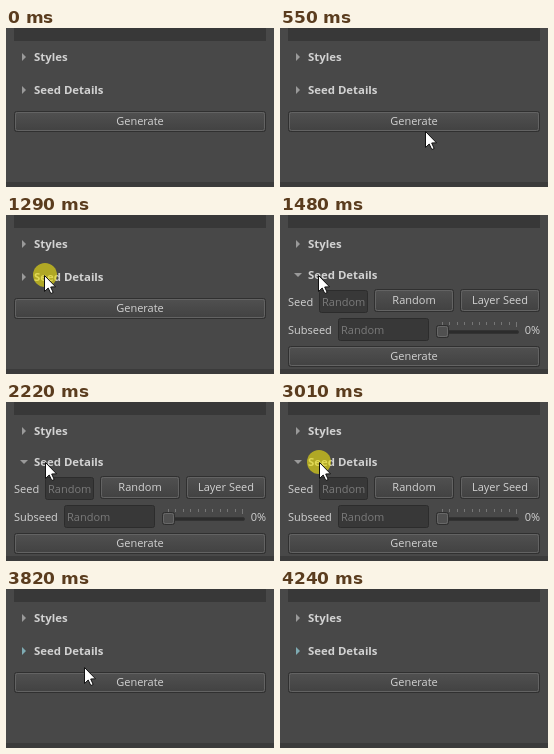
An HTML page with a canvas for the animation above (4900 ms loop, 268x159 px).

```html
<!DOCTYPE html>
<html lang="en">
<head>
<meta charset="utf-8">
<title>Seed panel</title>
<style>
html, body { margin: 0; width: 100%; height: 100%; overflow: hidden; background: #484848; }
canvas { display: block; width: 268px; height: 159px; }
</style>
</head>
<body>
<canvas id="stage" width="268" height="159"></canvas>
<script>
const ctx = document.getElementById('stage').getContext('2d');
const LOOP = 4900, STEP = 70;
const FONT = '"Open Sans", "Noto Sans", sans-serif';
const BG = '#484848', DARK = '#2c2c2c', TEXT = '#d2d2d2', ARROW = '#9a9a9a', FOCUS = '#7fabb3';

const within = (t, a, b) => t >= a && t < b;
const clamp = u => Math.min(1, Math.max(0, u));
const smooth = u => u * u * (3 - 2 * u);

// Pointer moves: when each starts and ends, and where it arrives.
const moves = [
  { from: 200, to: 550, x: 145, y: 103 },
  { from: 550, to: 690, x: 145, y: 88 },
  { from: 690, to: 900, x: 38, y: 60 },
  { from: 2150, to: 2220, x: 39, y: 60 },
  { from: 3680, to: 4170, x: 237, y: 152 }
];

function pointerAt(t) {
  let x = 214, y = 152;
  for (const m of moves) {
    const held = Math.floor((t - m.from) / STEP) * STEP;
    const u = smooth(clamp(held / (m.to - m.from)));
    x += (m.x - x) * u;
    y += (m.y - y) * u;
  }
  return [Math.round(x), Math.round(y)];
}

function rect(x, y, w, h, color) {
  ctx.fillStyle = color;
  ctx.fillRect(x, y, w, h);
}

function poly(points, fill, stroke) {
  ctx.beginPath();
  points.forEach(([x, y]) => ctx.lineTo(x, y));
  ctx.closePath();
  ctx.fillStyle = fill;
  ctx.fill();
  if (stroke) {
    ctx.strokeStyle = stroke;
    ctx.lineWidth = 1;
    ctx.stroke();
  }
}

function box(x, y, w, h, fill, stroke) {
  ctx.beginPath();
  ctx.roundRect(x + 0.5, y + 0.5, w - 1, h - 1, 2);
  ctx.fillStyle = fill;
  ctx.fill();
  ctx.strokeStyle = stroke;
  ctx.lineWidth = 1;
  ctx.stroke();
}

// Runs a drawing inside a clipped area.
function clipped(x, y, w, h, paint) {
  ctx.save();
  ctx.beginPath();
  ctx.rect(x, y, w, h);
  ctx.clip();
  paint();
  ctx.restore();
}

function text(str, x, base, color = TEXT, align = 'left', font = '11px') {
  ctx.font = `${font} ${FONT}`;
  ctx.textAlign = align;
  ctx.fillStyle = color;
  ctx.fillText(str, x, base);
}

function button(label, x, y, w, h, color = TEXT) {
  const shade = ctx.createLinearGradient(0, y, 0, y + h);
  shade.addColorStop(0, '#515151');
  shade.addColorStop(1, '#414141');
  box(x, y, w, h, shade, '#303030');
  box(x + 1, y + 1, w - 2, h - 2, shade, '#636363');
  text(label, x + w / 2, Math.floor(y + h / 2) + 4, color, 'center');
}

function field(x, y, w, h) {
  box(x, y, w, h, '#383838', DARK);
  clipped(x, y, w - 1, h, () => text('Random', x + 3, y + h / 2 + 4, '#7a7a7a'));
}

function header(label, y, open, color) {
  poly(open ? [[14, y - 2], [22, y - 2], [18, y + 2]]
            : [[16, y - 4], [20, y], [16, y + 4]], color);
  text(label, 28, y + 4, TEXT, 'left', '700 11.4px');
}

function slider(x, y) {
  for (let i = 0; i < 11; i++) {
    rect(x + Math.round(i * 7.4), y, 1, i % 10 ? 3 : 5, '#767676');
  }
  box(x, y + 8, 77, 4, DARK, '#333333');
  box(x - 6, y + 3, 13, 13, '#505050', '#2e2e2e');
  box(x - 5, y + 4, 11, 11, '#505050', '#686868');
}

function details() {
  text('Seed', 8, 91);
  field(39, 75, 49, 23);
  button('Random', 94, 74, 80, 23);
  button('Layer Seed', 180, 74, 80, 23);
  text('Subseed', 8, 119);
  field(58, 103, 91, 23);
  slider(162, 107);
  text('0%', 260, 119, TEXT, 'right');
}

// Rows squeezed to thin slices while the panel closes.
function squeezed() {
  clipped(8, 75, 252, 4, () => text('Seed', 8, 83));
  rect(39, 75, 49, 1, DARK);
  rect(58, 82, 91, 1, DARK);
  clipped(8, 81, 252, 4, () => {
    text('Subseed', 8, 89);
    text('0%', 260, 89, TEXT, 'right');
  });
}

function drawPointer(t) {
  ctx.save();
  ctx.translate(...pointerAt(t).map(v => v + 0.5));
  poly([[0, 0], [0, 16], [3.7, 12.5], [6.3, 18], [8.7, 17], [6.2, 11.5], [11, 11.3]],
    '#ffffff', '#111111');
  ctx.restore();
}

function drawClick() {
  ctx.beginPath();
  ctx.arc(39, 60, 12, 0, Math.PI * 2);
  ctx.fillStyle = 'rgba(230, 218, 20, 0.66)';
  ctx.fill();
}

function draw(t) {
  const open = within(t, 1480, 3350);
  const closing = within(t, 3350, 3420);
  const hover = within(t, 690, 760);

  rect(0, 0, 268, 159, BG);
  rect(8, 0, 252, 13, '#383838');
  rect(0, 154, 268, 5, '#3b3b3b');
  header('Styles', 29, false, ARROW);
  header('Seed Details', open || closing ? 60 : 62, open, t >= 3420 ? FOCUS : ARROW);

  if (open) details();
  if (closing) squeezed();
  button('Generate', 8, open ? 131 : closing ? 90 : 83, 252, 21, hover ? '#e8e8e8' : TEXT);

  if (within(t, 1290, 1420) || within(t, 3010, 3150)) drawClick();
  if (within(t, 200, 4240)) drawPointer(t);
}

const start = performance.now();
function tick() {
  draw((performance.now() - start) % LOOP);
  requestAnimationFrame(tick);
}
tick();
</script>
</body>
</html>
```
